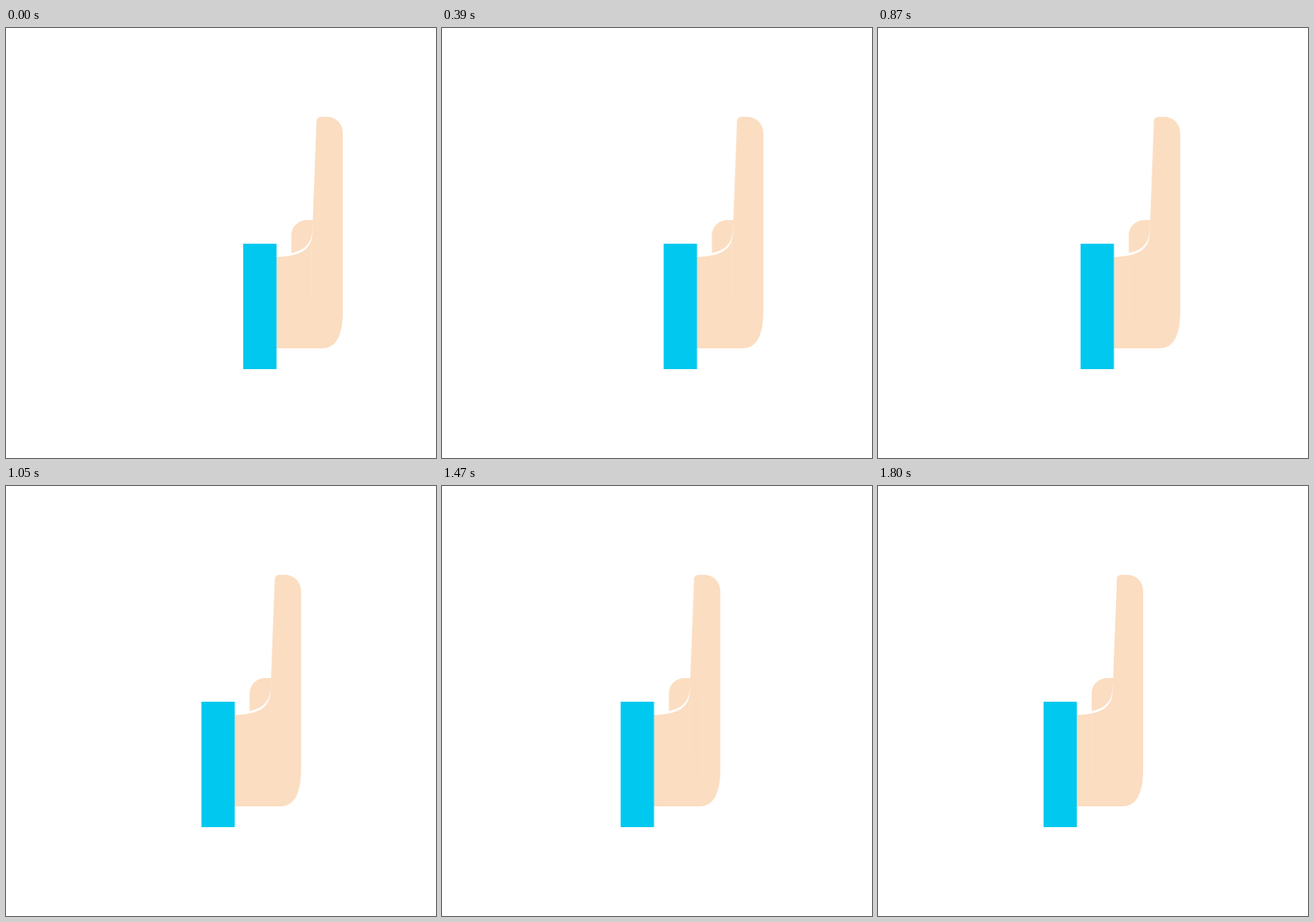
Animation, 600 px wide and 600 px high, one loop 1.83 s. Source, as an HTML page:

```html
<!DOCTYPE html>
<html lang="en">
<head>
<meta charset="utf-8">
<title>Sliding hand</title>
<style>
  html, body {
    margin: 0;
    width: 100%;
    height: 100%;
    overflow: hidden;
    background: #fff;
  }
  svg {
    display: block;
    width: 100vw;
    height: 100vh;
  }
  .hand {
    animation: slide 1830ms steps(61) infinite;
  }
  .skin { fill: #fbddc1; }
  .cuff { fill: #00c8ee; }
  .seams {
    stroke: #fff;
    stroke-opacity: .13;
  }
  /* 100px over the 60 intervals between 61 positions */
  @keyframes slide {
    to { transform: translateX(-101.6667px); }
  }
</style>
</head>
<body>
<svg viewBox="0 0 600 600">
  <g class="hand">
    <path class="skin" d="M398.2 314V290C398.2 277.5 407.5 268 420 268H428.2L427.4 283C426.5 300 417 310.5 398.2 314Z"/>
    <path class="skin" d="M377.5 319.5C411 318.5 426.5 309 427.4 287L433.3 130C433.4 126.5 436 124 439.5 124H447.5C460.5 124 470 134 470 146.5V395C470 430 460 447 441 447H377.5Z"/>
    <path class="seams" d="M398.2 318V408M426.5 300V376M445.8 287V408"/>
    <rect class="cuff" x="331" y="301" width="46.5" height="175"/>
  </g>
</svg>
</body>
</html>
```
